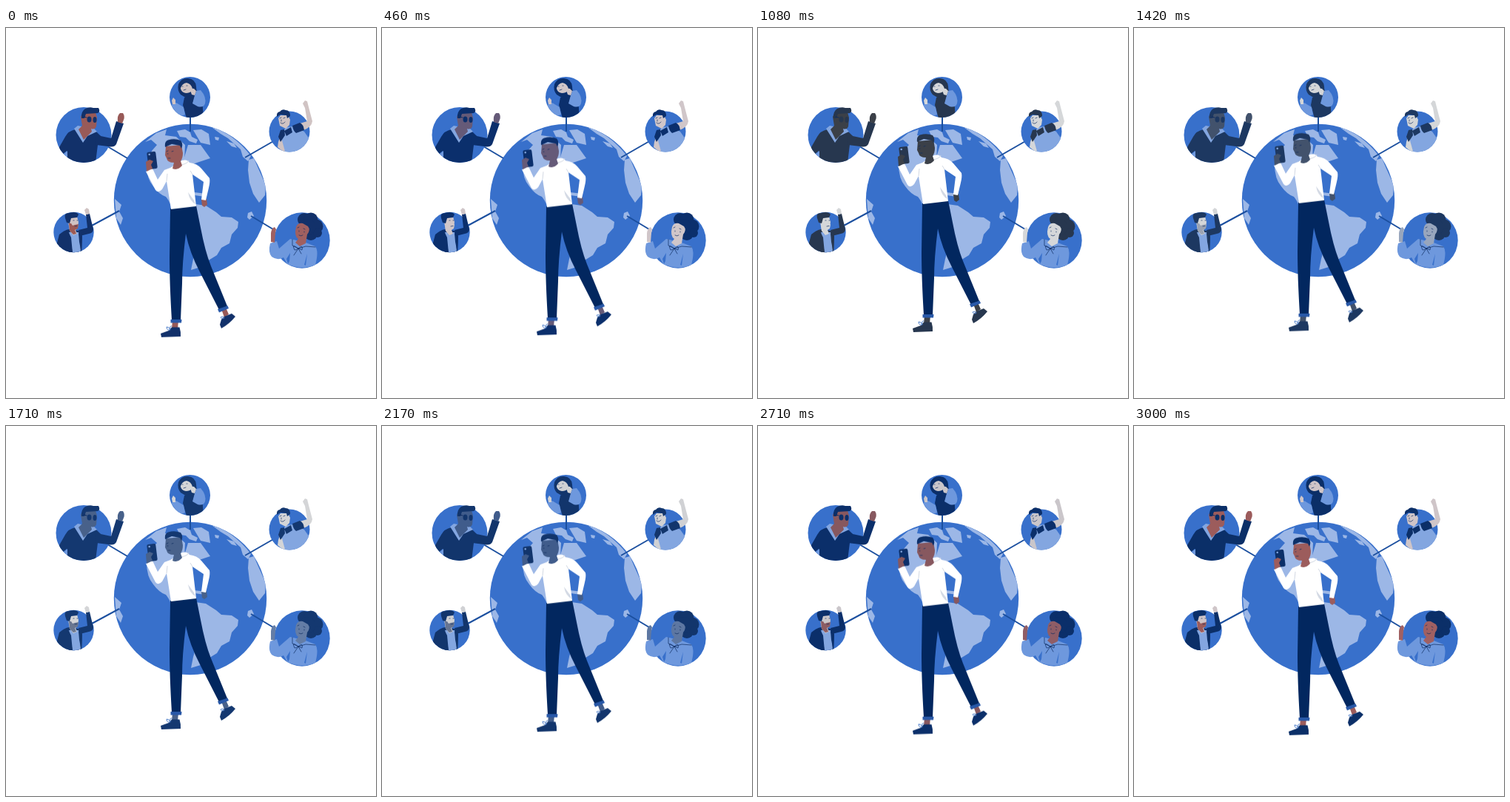
Write an HTML page that moves like this. It is 500 px wide and 500 px high and loops after 3.04 s.

```html
<!DOCTYPE html>
<html lang="en">
<head>
<meta charset="utf-8">
<title>Connected people</title>
<style>
html, body { margin: 0; width: 100%; height: 100%; overflow: hidden; background: #fff; }
svg { display: block; width: 100vw; height: 100vh; }
.blue { fill: #3870cb; }
.land { fill: #9cb7e6; }
.light { fill: #6e98dd; }
.hood { fill: #83a6e0; }
.white { fill: #fff; }
.shade { fill: #d3d9e4; }
.pants { fill: #02275f; }
.cuff { fill: #2858a8; }
.skin { fill: #985a58; }
.curl { fill: #a06060; }
.beard { fill: #9c5a55; }
.pale { fill: #d0c3c3; }
.navy { fill: #12316a; }
.link { stroke: #1b4f9f; stroke-width: 2; }
.ink { fill: none; stroke: #0d2b60; stroke-linecap: round; }
.thin { stroke-width: .7; }
.lace { fill: none; stroke: #4f7fc9; }
.fold { fill: none; stroke: #d3d9e4; }
</style>
</head>
<body>
<svg viewBox="0 0 500 500">
  <defs>
    <clipPath id="globe"><circle cx="249" cy="233" r="103.200"/></clipPath>
    <clipPath id="discA"><circle cx="105" cy="144.500" r="37.500"/></clipPath>
    <clipPath id="discB"><circle cx="248.500" cy="93.500" r="27.500"/></clipPath>
    <clipPath id="discC"><circle cx="383" cy="140" r="27.500"/></clipPath>
    <clipPath id="discD"><circle cx="91.500" cy="276" r="27.200"/></clipPath>
  </defs>

  <circle class="blue" cx="249" cy="233" r="103.200"/>
  <g class="land" clip-path="url(#globe)">
    <path d="M188 154L203 142L217 137L215 145L230 147L242 158L240 200L223 240Q219 231 216 228Q207 225 199 214Q190 204 190 184L197 166L204 158L196 151Z"/>
    <path d="M231 139L242 137L249 141L251 147L259 151L257 156L248 153L243 148L235 147Z"/>
    <path d="M246 158L263 158L276 176L258 182L247 186L240 178Z"/>
    <path d="M253 138L264 137L274 143L276 158L263 155Z"/>
    <path d="M278 134Q308 143 331 173L327 180L320 174L317 164L309 157L300 149L290 143Z"/>
    <path d="M282 147L288 148L287 152L283 151ZM298 153L308 156L312 162L305 160Z"/>
    <path d="M328 178L335 176L341 190L351 212L350 226L342 236L334 224L329 209L327 192Z"/>
    <path d="M254 222L271 224L269 228L255 226Z"/>
    <path d="M256 238L270 240L284 249L291 255L305 256L314 262L313 270L305 279L302 291L291 297L285 307L272 315L263 323L250 327L253 312L259 290L250 270Z"/>
    <path d="M327 250L332 248L335 254L329 259L326 256Z"/>
    <path d="M147 231L156 239L153 248L158 257L155 266L149 257Z"/>
  </g>

  <path class="link" d="M249 120V140M137 160L164 176M370 148L323 175M116 267L153 247M361 272L331 254"/>

  <!-- upper left: hooded jacket and shades -->
  <circle class="blue" cx="105" cy="144.500" r="37.500"/>
  <g clip-path="url(#discA)">
    <path class="navy" d="M68 168L80 147Q84 139 94 137L121 139L128 146L124 158L121 182H82V166L75 172Z"/>
    <path class="light" d="M75 173L83 166V180Z"/>
  </g>
  <path class="navy" d="M119 140L128 146L142 149L149 126L159 129L149 157Q146 162 138 160L122 158Z"/>
  <path class="hood" d="M97 132L92 136L104 155L110 146L123 140L119 136Z"/>
  <path class="skin" d="M101 120L104 114H121L123 121L122 133Q120 138 115 136L116 140L105 151L98 137L103 132Z"/>
  <path class="navy" d="M102 122Q101 113 107 109Q113 106 118 108L125 108Q128 113 124 115L108 116L106 122Z"/>
  <path class="ink" d="M105 120L109 121"/>
  <ellipse class="navy" cx="112.500" cy="123.500" rx="3" ry="4"/>
  <ellipse class="navy" cx="120" cy="124" rx="2.500" ry="4"/>
  <path class="skin" d="M151 127Q150 118 154 115L158 115Q161 119 159 124L157 129Z"/>

  <!-- top: long hair, hand at the ear -->
  <circle class="blue" cx="248.500" cy="93.500" r="27.500"/>
  <g clip-path="url(#discB)">
    <path class="navy" d="M233 76Q237 67 246 68Q256 69 257 79Q257 86 261 92L246 96L236 90Q231 84 233 76Z"/>
    <path class="navy" d="M241 94L253 90L265 96L267 122H244L239 104Z"/>
    <path class="light" d="M223 104L230 101L240 107L242 117L234 120Z"/>
    <path class="light" d="M255 91L257 85L263 84Q271 93 269 102Q267 108 259 106L252 102Z"/>
  </g>
  <path class="pale" d="M236 78L241 73Q248 72 252 77L252 84Q249 88 243 88Q237 87 236 82Z"/>
  <path class="pale" d="M224 98L226 94L229 97L229 103L225 103ZM249 84L251 81L254 82L257 85L255 91L251 90Z"/>
  <path class="navy" d="M234 80Q235 69 245 69Q255 70 256 80L252 82Q250 75 244 74Q238 75 236 81Z"/>
  <path class="ink thin" d="M238 79l1 0M244 78l1 0M240 84l3-1"/>

  <!-- upper right: raised arm -->
  <circle class="blue" cx="383" cy="140" r="27.500"/>
  <g clip-path="url(#discC)">
    <path class="hood" d="M371 143L379 134L389 133L403 140L410 150L401 170H374L369 154Z"/>
    <path class="pale" d="M368 154L371 145L376 163L378 170L367 161Z"/>
    <path class="navy" d="M368 147L371 138L376 137L377 145L371 154ZM376 139L385 134L387 141L379 146Z"/>
  </g>
  <path class="pale" d="M397 129L407 126L404 108L401 102L404 98L407 99L409 107L414 126Q413 134 402 138Z"/>
  <path class="navy" d="M387 132L397 128Q402 130 403 138L392 142Q388 139 387 132Z"/>
  <path class="pale" d="M368 122L371 118H381L384 124L383 131L378 136L370 132Z"/>
  <path class="navy" d="M366 120Q365 114 370 113Q373 109 378 111Q384 111 384 119L380 122L379 118L371 117Z"/>
  <path class="ink thin" d="M370 122l2-1M375 122l2-1M371 128q3 3 6-1M372 124v2"/>

  <!-- lower left: beard and jacket -->
  <circle class="blue" cx="91.500" cy="276" r="27.200"/>
  <g clip-path="url(#discD)">
    <path class="navy" d="M68 294L72 279Q79 273 85 272L98 274L103 281L102 305H68Z"/>
    <path class="hood" d="M85 276L98 276L100 287L101 304H90Z"/>
    <path class="navy" d="M98 277L103 281L102 304L99 289ZM84 275L88 283L90 304H84Z"/>
  </g>
  <path class="navy" d="M98 273L110 270L108 252L113 251L118 272Q118 277 112 278L100 281Z"/>
  <path class="pale" d="M108 252L106 246L109 243L112 245L113 251ZM84 262L87 255H96L98 262L97 270L94 273L96 278L91 280L86 274Z"/>
  <path class="beard" d="M85 264L88 264L90 267L93 266L98 265L97 271L93 273L95 278L91 279L86 274Z"/>
  <path class="navy" d="M80 257Q78 250 85 250Q95 247 98 252L96 256L88 257L86 264L82 263Z"/>
  <path class="ink thin" d="M91 260h1M96 260h1M93 268l3-.5"/>

  <!-- lower right: curly hair -->
  <circle class="blue" cx="400" cy="287" r="37.700"/>
  <g class="navy">
    <circle cx="403" cy="259" r="9"/><circle cx="412" cy="259" r="9.500"/>
    <circle cx="419" cy="268" r="9.500"/><circle cx="412" cy="278" r="9"/>
    <circle cx="421" cy="277" r="6"/><circle cx="407" cy="269" r="11"/>
  </g>
  <path class="light" d="M357 291L366 288L369 298L384 285L405 290L418 295Q423 302 418 320Q400 328 380 319L375 310Q367 315 359 309Q354 303 357 291Z"/>
  <path class="blue" d="M379 312L384 304L383 315L381 319ZM403 320L407 305L405 321Z"/>
  <path class="curl" d="M392 269Q394 263 401 264L408 268Q412 273 407 279L405 291L397 295L391 290L395 285Q389 281 392 269Z"/>
  <path class="curl" d="M358 289L358 277Q359 270 363 269L365 272L364 277L363 290Z"/>
  <path class="ink thin" d="M387 286L387 294L395 298L405 295L418 296M395 298Q385 290 390 300Q393 300 395 298Q402 292 400 300L395 298L389 307M395 298L399 305"/>
  <path class="ink thin" d="M394 270l2-1M402 271l2 1M396 274v1M403 275v1M396 280q3 2 5 0"/>

  <g id="walker">
    <path class="skin" d="M225 395h8l-1 12h-8ZM291 380L297 378L301 387L295 391Z"/>
    <path class="pants" d="M222 244L257 240L263 270Q269 302 277 322L299 376L288 381L262 330Q248 303 243 278Q238 318 238 345L236 395L224 395Q221 345 221 310Z"/>
    <path class="cuff" d="M222.500 394H237.500L237 398.500H222.500ZM286 380L299.500 375.500L301 379L288 384.500Z"/>
    <path class="navy" d="M209 413L220 409L224 404.500L234.500 404.500Q236.500 411 236 417L210 418ZM289 401L291 394L295 390L305 386L310 390Q302 400 291 406Z"/>
    <path class="lace" d="M217 404q4 0 5 4q-5 1-5-4M222 408q-1-6 2-5M290 391q4-2 5 1q-4 2-5-1"/>
    <path class="skin" d="M264 232L271 231L272 239L268 242L265 240Z"/>
    <path class="white" d="M222 189L238 179Q245 177 248 182Q258 183 264 190L275 203Q276 208 274 216L270 233L264 232L267 208L252 198L257 241L223 245L217 207L211 218Q206 224 202 219L189 194L198 190L205 205L214 192Z"/>
    <path class="fold" d="M237 185Q246 183 247 179M217 207L218 197M252 198L249 193"/>
    <path class="shade" d="M246 222L254 233L256 238Q248 234 246 222Z"/>
    <path class="skin" d="M216 160L237 158L239 169Q239 176 236 180L238 186Q232 193 225 190L227 182Q218 182 217 176L215 172Z"/>
    <path class="navy" d="M215 161Q214 153 219 151.500Q228 149 236 152Q240 157 237 163L235 159L224 157Z"/>
    <path class="ink thin" d="M217 167l2-1M218 170h1M224 167l2-.5M219 176l3 0"/>
    <rect class="navy" x="191.500" y="167.500" width="12" height="23" rx="2" transform="rotate(-7 197.500 179)"/>
    <circle class="hood" cx="193.700" cy="171" r="1.300"/>
    <path class="skin" d="M189 181L194 178L199 180L196 185L198 190L190 194Z"/>
  </g>
</svg>
<script>
const loop = 3040;
const stops = [0, 460, 1080, 1710, 2170, 2710, 3000];
const tones = {
  skin: ['#985a58', '#655a78', '#3b4048', '#48618a', '#405c8b', '#87585f', '#9c5c5c'],
  curl: ['#a06060', '#d0c6c9', '#d5d7d9', '#647da6', '#5d77a2', '#8f5d66', '#a06062'],
  beard: ['#9c5a55', '#d0c6c9', '#d5d7d9', '#6a7791', '#667491', '#8d5c63', '#9c5c5c'],
  pale: ['#d0c3c3', '#d0c6c9', '#d5d7d9', '#d4d5d7', '#d0d1d4', '#cac6ca', '#cfc5c8'],
  navy: ['#12316a', '#0b2f6c', '#27374f', '#143870', '#12356c', '#0b2f6a', '#0b2f68']
};
const lift = [[0, 0], [460, -2.8], [1080, -7], [1440, -8.3], [1710, -8], [2170, -4.8], [2710, -1.3], [loop, 0]];
const timing = { duration: loop, iterations: Infinity };
const start = document.timeline.currentTime ?? performance.now();

function play(node, frames) {
  node.animate(frames, timing).startTime = start;
}

for (const [name, colors] of Object.entries(tones)) {
  const frames = colors.map((fill, i) => ({ fill, offset: stops[i] / loop }));
  frames.push({ fill: colors[0], offset: 1 });
  document.querySelectorAll('.' + name).forEach(node => play(node, frames));
}

play(document.getElementById('walker'), lift.map(([time, y]) => ({
  transform: `translateY(${y}px)`, offset: time / loop
})));
</script>
</body>
</html>
```
